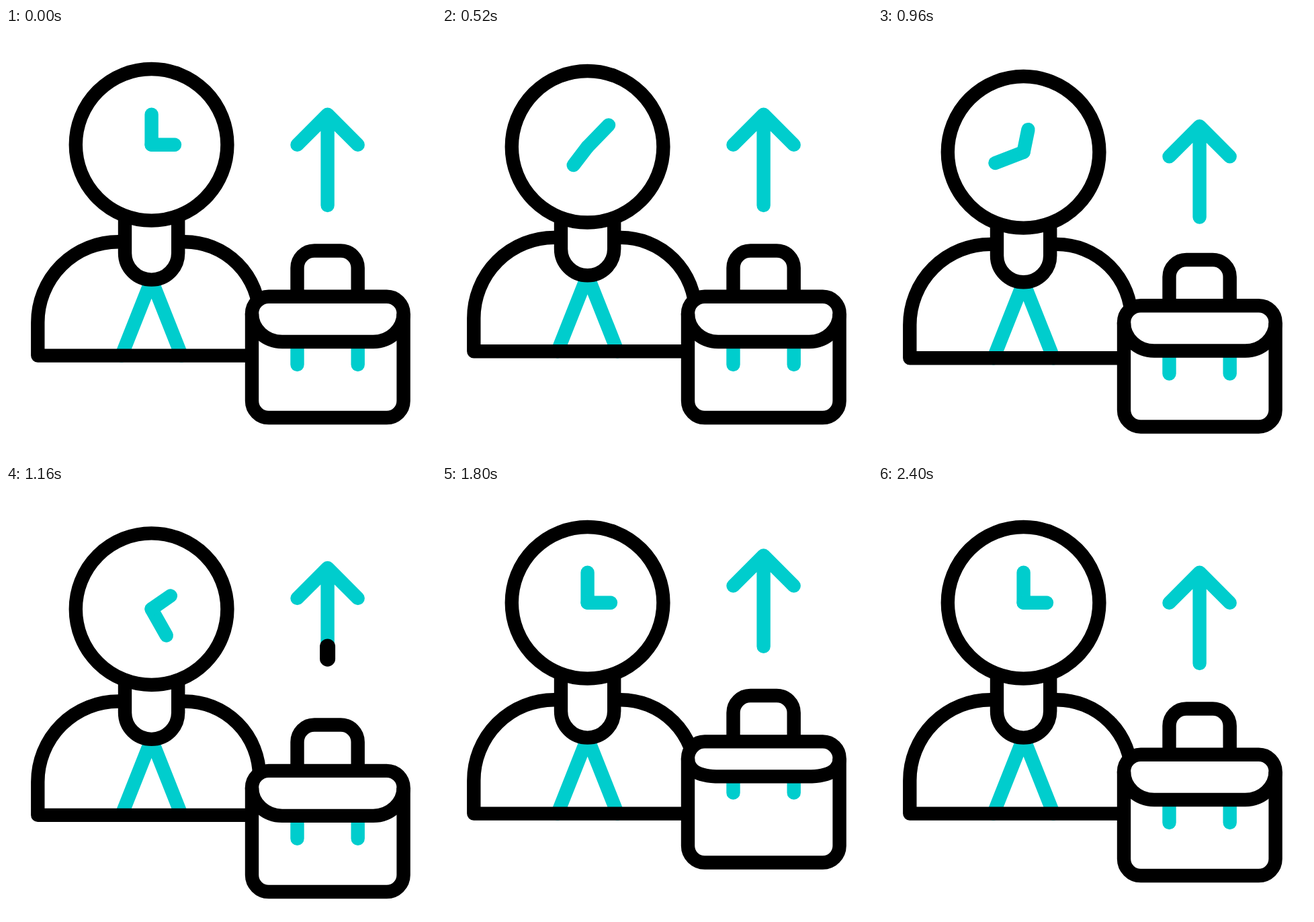
Write an HTML page that moves like this. It is 640x640 px and loops after 2960 ms.

```html
<!DOCTYPE html>
<html lang="en">
<head>
<meta charset="utf-8">
<title>Work time</title>
<style>
  html, body { margin: 0; width: 100%; height: 100%; overflow: hidden; background: #fff; }
  svg { display: block; width: 100%; height: 100%; }
  .ink { fill: #fff; stroke: #000; stroke-width: 20.4; stroke-linejoin: round; }
  .line { fill: none; }
  .cyan { fill: none; stroke: #00cdcd; stroke-width: 20.4; stroke-linecap: round; stroke-linejoin: round; }
</style>
</head>
<body>
<svg viewBox="0 0 640 640">
  <g id="body">
    <path class="cyan" d="M172 487.5 L216.6 375 L261.2 487.5"/>
    <path class="ink line" d="M177 318.2 H167.3 A120 120 0 0 0 47.3 438.2 V487.6 H366 M256 318.2 H266 A111 111 0 0 1 377 429.2"/>
    <path class="ink" d="M177 250 V335 A39.6 39.6 0 0 0 256.2 335 V250"/>
  </g>
  <g id="head">
    <circle class="ink" cx="216.6" cy="173.8" r="112.8"/>
    <path id="minute" class="cyan" d="M216.6 173.8 V128.7"/>
    <path id="hour" class="cyan" d="M216.6 173.8 V139.4"/>
  </g>
  <g id="arrow">
    <path class="cyan" d="M478.6 264 V128.8 M433.5 173.9 L478.6 128.8 L523.7 173.9"/>
    <path id="streak" fill="none" stroke="#000" stroke-width="23" stroke-linecap="round"/>
  </g>
  <g id="bag">
    <path class="ink" d="M433.5 400 V357 A25.5 25.5 0 0 1 459 331.5 H498.2 A25.5 25.5 0 0 1 523.7 357 V400"/>
    <rect fill="#fff" x="366" y="400" width="225.6" height="180" rx="25"/>
    <path id="clasps" class="cyan"/>
    <path id="flap" class="ink"/>
    <rect class="ink line" x="366" y="399.8" width="225.6" height="180.2" rx="25"/>
  </g>
</svg>
<script>
const LOOP = 2960, STEP = 40;
const el = id => document.getElementById(id);
const [body, head, minute, hour, arrow, streak, bag, clasps, flap] =
  ["body", "head", "minute", "hour", "arrow", "streak", "bag", "clasps", "flap"].map(el);

// [time, value] keys, eased in and out between neighbours
const bodyKeys = [[0, 0], [240, 18], [640, -13], [960, 3.7], [1440, 0]];
const headKeys = [[0, 0], [410, 24], [680, -34], [1010, 14], [1400, 0]];
const arrowKeys = [[710, 0], [1000, 18.4], [1470, -75.3], [2010, 0]];
const bagKeys = [[800, 0], [1115, 26.3], [1520, -40], [2070, 0]];
const flapKeys = [[1140, 0], [1500, 1], [1600, 1], [2240, -0.2], [2400, 0]];
const streakFront = [[1040, 0], [1560, 1]];
const streakBack = [[1240, 0], [1760, 1]];

function ease(u) { return u * u * (3 - 2 * u); }

function at(keys, t) {
  if (t <= keys[0][0]) return keys[0][1];
  for (let i = 1; i < keys.length; i++) {
    const [t0, a] = keys[i - 1], [t1, b] = keys[i];
    if (t < t1) return a + (b - a) * ease((t - t0) / (t1 - t0));
  }
  return keys[keys.length - 1][1];
}

// Cubic Bezier timing for the clock hands
function clockTurn(t) {
  const x = Math.min(t / 1590, 1);
  let lo = 0, hi = 1;
  for (let i = 0; i < 24; i++) {
    const s = (lo + hi) / 2, r = 1 - s;
    const v = 3 * r * r * s * 0.2935 + 3 * r * s * s * 0.4695 + s * s * s;
    if (v < x) lo = s; else hi = s;
  }
  return ease(hi);
}

function shift(node, y) { node.setAttribute("transform", `translate(0 ${y})`); }
function turn(node, deg) { node.setAttribute("transform", `rotate(${deg} 216.6 173.8)`); }

function draw(t) {
  shift(body, at(bodyKeys, t));
  shift(head, at(headKeys, t));
  shift(arrow, at(arrowKeys, t));
  shift(bag, at(bagKeys, t));

  const k = clockTurn(t);
  turn(minute, 2160 * k);
  turn(hour, 90 + 360 * k);

  const front = at(streakFront, t), back = at(streakBack, t);
  streak.style.display = front - back > 0.005 ? "" : "none";
  streak.setAttribute("d", `M478.6 ${264 - 135 * back} V${264 - 135 * front}`);

  const f = at(flapKeys, t);
  const low = 467 - 21 * f, c1 = 448 - 12 * f, c2 = 386 - 14 * f, end = 411 + 4 * f;
  const flip = x => 957.6 - x;
  flap.setAttribute("d", `M366 425 C366 ${c1} ${c2} ${low} ${end} ${low} H${flip(end)} ` +
    `C${flip(c2)} ${low} 591.6 ${c1} 591.6 425`);
  const tip = 501 - 34.5 * f;
  clasps.setAttribute("d", `M433.5 ${low} V${tip} M523.7 ${low} V${tip}`);
}

const start = performance.now();
function tick() {
  const t = Math.max(0, performance.now() - start) % LOOP;
  draw(Math.floor(t / STEP) * STEP);
  requestAnimationFrame(tick);
}
draw(0);
requestAnimationFrame(tick);
</script>
</body>
</html>
```
